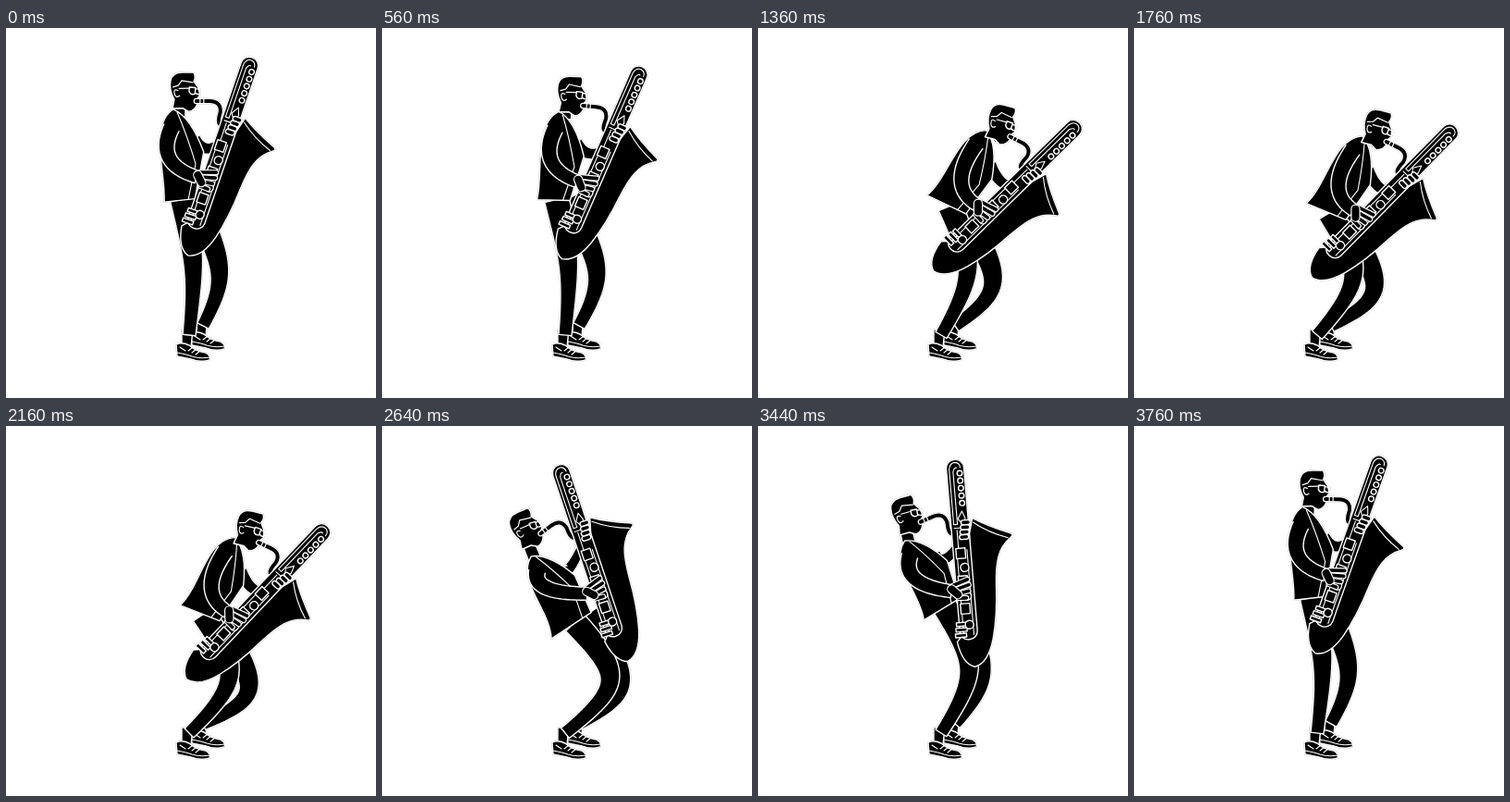
An HTML page with a canvas that plays this animation: 400x400 px, repeating every 3840 ms.

```html
<!DOCTYPE html>
<html lang="en">
<head>
<meta charset="utf-8">
<title>Saxophone player</title>
<style>
html, body { margin: 0; height: 100%; overflow: hidden; background: #fff; }
canvas { display: block; filter: drop-shadow(0 0 .7px #999); }
</style>
</head>
<body>
<canvas id="stage" width="400" height="400"></canvas>
<script>
const ctx = document.getElementById('stage').getContext('2d');
const LOOP = 3840, STEP = 80, RAD = Math.PI / 180;

// Turning points of the sway: time, saxophone tip x, y, angle, hip x, y.
// The rest of the body follows from these.
const POSES = [
  [280, 251, 30, -4, 186, 186],
  [1120, 360, 88, 31, 203, 187],
  [1360, 346, 101, 27, 208, 193],
  [2160, 346, 107, 25, 214, 204],
  [2240, 328, 68, 15, 212, 198],
  [2640, 189, 43, -37, 209, 213],
  [3200, 174, 40, -39, 207, 205],
  [3760, 266, 32, 1, 193, 186]
];

// Periodic cubic interpolation that never overshoots a key.
function poseAt(time) {
  const n = POSES.length, i = POSES.findLastIndex(p => p[0] <= time);
  const key = (k, c) => POSES[(k + n) % n][c] + (c ? 0 : Math.floor(k / n) * LOOP);
  const slope = (k, c) => (key(k + 1, c) - key(k, c)) / (key(k + 1, 0) - key(k, 0));
  const tangent = (k, c) => {
    const a = slope(k - 1, c), b = slope(k, c);
    return a * b > 0 ? 2 * a * b / (a + b) : 0;
  };
  const span = key(i + 1, 0) - key(i, 0), u = (time - key(i, 0)) / span;
  return [1, 2, 3, 4, 5].map(c =>
    key(i, c) + (key(i + 1, c) - key(i, c)) * u * u * (3 - 2 * u)
      + span * u * (1 - u) * ((1 - u) * tangent(i, c) - u * tangent(i + 1, c)));
}

const mix = (a, b, k) => [a[0] + (b[0] - a[0]) * k, a[1] + (b[1] - a[1]) * k];
const shift = (p, x, y) => [p[0] + x, p[1] + y];
const turn = (x, y, a) => [x * Math.cos(a) - y * Math.sin(a), x * Math.sin(a) + y * Math.cos(a)];

function ink(path) {
  ctx.lineWidth = 1.4;
  ctx.fill(path);
  ctx.stroke(path);
}
const shape = d => ink(new Path2D(d));
function line(d, width = 1.1) {
  ctx.lineWidth = width;
  ctx.stroke(new Path2D(d));
}
function box(x, y, w, h, r = 0) {
  const p = new Path2D();
  p.roundRect(x, y, w, h, r);
  ink(p);
}
const ring = (x, y, r) => box(x - r, y - r, 2 * r, 2 * r, r);
function tube(d, width) {
  line(d, width + 2.4);
  ctx.strokeStyle = '#000';
  line(d, width);
  ctx.strokeStyle = '#fff';
}

// Tapered limb bending at a joint; a higher bend makes a sharper corner.
function limb(a, joint, b, w0, w1, bend = 1) {
  const c = mix(mix(a, b, .5), joint, 1 + 1 / bend);
  const centre = u => {
    const k = 2 * bend * u * (1 - u), p = (1 - u) ** 2, q = u * u;
    return [0, 1].map(j => (a[j] * p + c[j] * k + b[j] * q) / (p + k + q));
  };
  const left = [], right = [];
  for (let u = 0; u <= 1; u += 1 / 32) {
    const m = centre(u), p = centre(u - .01), q = centre(u + .01);
    const dx = q[0] - p[0], dy = q[1] - p[1];
    const k = (w0 + (w1 - w0) * u) / 2 / Math.hypot(dx, dy);
    left.push(shift(m, -dy * k, dx * k));
    right.unshift(shift(m, dy * k, -dx * k));
  }
  shape('M' + left.concat(right).join('L'));
}

function leg(hip, ankle, thigh, shin) {
  const dx = ankle[0] - hip[0], dy = ankle[1] - hip[1], d = Math.hypot(dx, dy);
  const along = (thigh ** 2 - shin ** 2 + d * d) / (2 * d);
  const out = Math.sqrt(Math.max(0, thigh ** 2 - along ** 2));
  const knee = shift(hip, (dx * along + dy * out) / d, (dy * along - dx * out) / d);
  limb(hip, knee, ankle, 27, 14, 2);
}

function inFrame([x, y], angle, [ax, ay], scale, draw) {
  ctx.save();
  ctx.translate(x, y);
  ctx.rotate(angle);
  ctx.scale(scale, scale);
  ctx.translate(-ax, -ay);
  draw();
  ctx.restore();
}

function shoe() {
  shape('M190 326V342L200 345L202 326Z');
  shape('M184 342Q190 339 198 343Q206 350 216 351Q222 354 220 359Q210 362 200 358L185 355Z');
  line('M185 351Q196 353 201 355Q210 358 220 356M188 345L194 349');
  for (let i = 0; i < 3; i++) line(`M${197 + 4 * i} ${349 + 2 * i}l5 -4`);
}

function head() {
  shape('M182 88L183 79Q177 70 178 61Q179 53 189 52L200 51Q203 55 201 60L206 66L208 73L206 76L208 79L206 82Q204 89 198 90L192 87Z');
  line('M181 67L186 65L189 60L200 61M187 68L197 67M186 70Q181 68 183 74Q185 78 188 75');
  line('M197 66H203V72Q199 74 197 70ZM203 67H208V72Q205 73 203 71', 1.3);
}

function saxophone() {
  tube('M205 79L219 79Q232 79 231 91Q226 107 235 104L241 94', 4);
  line('M209 76V82M213 76V82', 1.2);
  shape('M258 97Q268 110 290 129Q292 132 287 133C270 138 262 152 253 174Q241 205 227 226Q212 248 197 246Q186 238 190 214L215 200L248 112Z');
  line('M257 102Q268 119 285 132');
  inFrame([262, 39], 18.5 * RAD, [0, 0], 1, () => {
    box(-9, -8, 19, 195, 9);
    line('M-6 62V2Q-5 -5 1 -5Q6 -4 6 1M-2 62V5Q0 0 2 1M-6 62H-2');
    for (let i = 0; i < 5; i++) ring(5, 7 + i * 8.1, 2.8);
    line('M-6 66H8M-3 68V88M4 48L-1 56L4 63L7 56ZM6 90V182M-5 100V182');
    for (let i = 0; i < 3; i++) {
      box(-6, 88 + i * 30, 10, 11);
      ring(2, 109 + i * 31, 4.5);
      box(-12 - i, 168 + i * 6, 12, 4);
    }
    for (let i = 0; i < 4; i++) box(2 - i, 58 + i * 5.2, 10, 5, 2.5);
  });
}

function nearHand() {
  for (let i = 0; i < 4; i++) tube(`M210 ${156 + i * 5}l${17 - i * i} ${i}`, 3.6);
  tube('M207 159L211 167', 8);
}

function draw(time) {
  const [sx, sy, degrees, hx, hy] = poseAt(time);
  const angle = degrees * RAD, hip = [hx, hy], tip = [263, 31];
  const onSax = (x, y) => shift([sx, sy], ...turn(x - tip[0], y - tip[1], angle));
  const mouth = onSax(204, 80), wrist = onSax(206, 161), farHand = onSax(245, 109);

  // Torso frame: 0..1 from nape to hip, and pixels towards the back.
  const nape = shift(mouth, ...turn(-24, 8, angle * 1.3));
  const length = Math.hypot(hx - nape[0], hy - nape[1]);
  const body = (down, back) => shift(mix(nape, hip, down),
    -(hy - nape[1]) / length * back, (hx - nape[0]) / length * back);
  const flare = 20 + Math.abs(degrees) * .3;
  const tail = body(1, flare), hem = body(1, -flare * .66), chest = body(.5, -28);

  ctx.clearRect(0, 0, 400, 400);
  ctx.fillStyle = '#000';
  ctx.strokeStyle = '#fff';
  ctx.lineJoin = ctx.lineCap = 'round';

  inFrame([16, -12], 0, [0, 0], 1, shoe);
  shoe();
  leg(body(1, -flare * .5), [213, 322], 82, 63);
  leg(hip, [198, 332], 72, 75);

  const farShoulder = mix(nape, chest, .7);
  limb(farShoulder, shift(mix(farShoulder, farHand, .5), -3, 15), farHand, 14, 9);
  const jaw = shift(mouth, -17, 0), throat = shift(nape, 6, 8);
  limb(jaw, mix(jaw, throat, .5), throat, 13, 14);

  shape(`M${nape}C${body(.15, 28)} ${body(.7, 15)} ${tail}L${hem}L${chest}Q${body(.1, -18)} ${nape}Z`);
  line(`M${body(.04, -4)}Q${body(.3, -12)} ${body(.62, -18)}L${body(1, -flare * .3)}`);

  inFrame(mouth, (degrees * .6 + 4) * RAD, [204, 80], 1.1, head);
  inFrame([sx, sy], angle, tip, 1, saxophone);

  const shoulder = body(.2, 4);
  limb(shoulder, shift(mix(shoulder, wrist, .5), -16, 6), wrist, 18, 14);
  inFrame([sx, sy], angle, tip, 1, nearHand);
}

function tick() {
  draw(Math.floor(performance.now() % LOOP / STEP) * STEP);
  requestAnimationFrame(tick);
}
tick();
</script>
</body>
</html>
```
